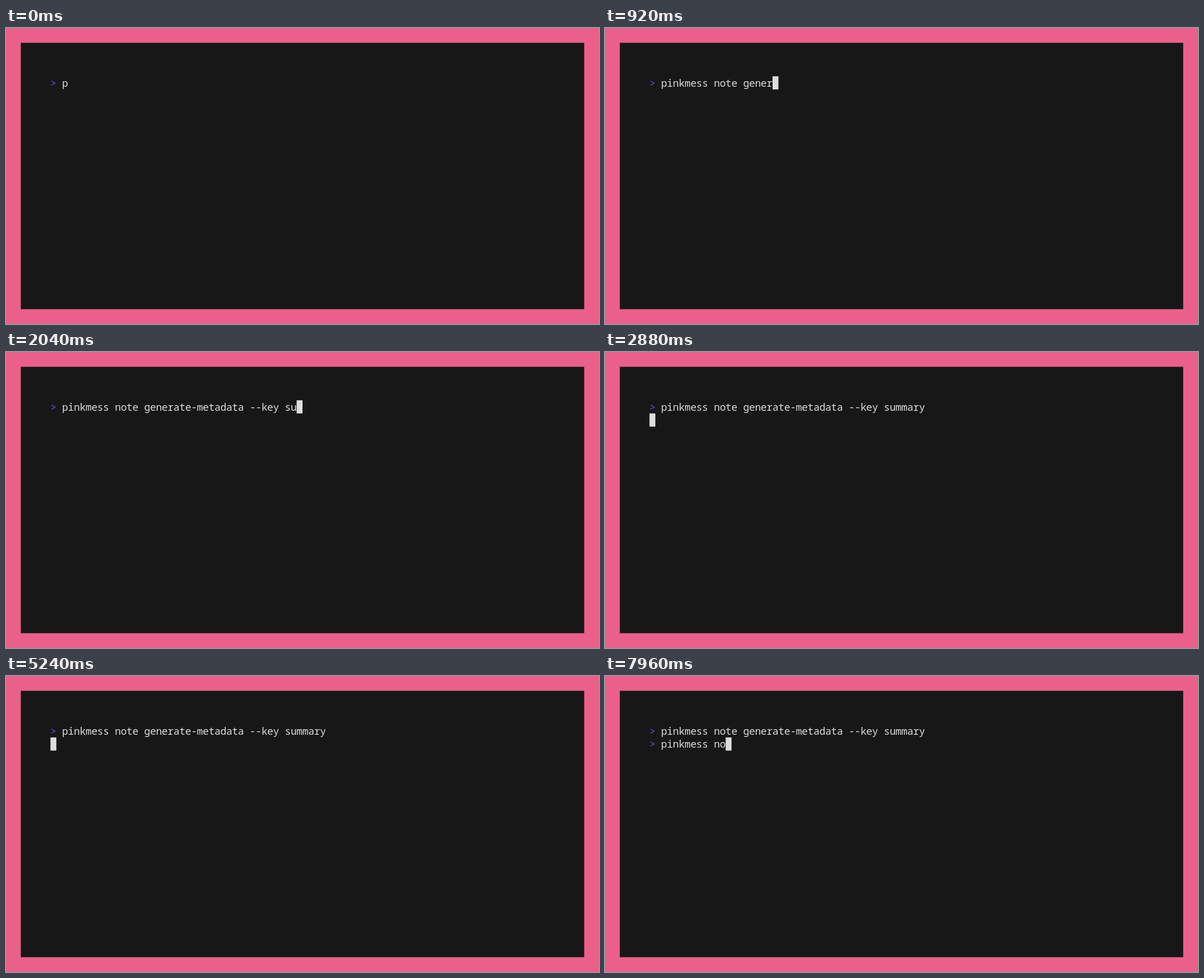
Write an HTML page with a canvas that moves like this. It is 1058x529 px and loops after 8000 ms.

```html
<!DOCTYPE html>
<html lang="en">
<head>
<meta charset="utf-8">
<title>Terminal</title>
<style>
  html, body { margin: 0; width: 100%; height: 100%; overflow: hidden; background: #eb608b; }
  canvas { display: block; }
</style>
</head>
<body>
<canvas id="stage" width="1058" height="529"></canvas>
<script>
const ctx = document.getElementById("stage").getContext("2d");
const LOOP = 8000, TICK = 40;
const CELL = 10.457, LINE = 23.5, LEFT = 79.35, TOP = 86.3, MARGIN = 26.45;
const COMMAND = "pinkmess note generate-metadata --key summary";
const ENTER = 2880, PROMPT = 6960, RETYPE = 7440;
const PINK = "#eb608b", DARK = "#171717", LIGHT = "#dddddd", VIOLET = "#5a56e0";

// Three characters land in every four ticks.
const keysBy = time => {
  const tick = Math.floor(time / TICK);
  return tick - Math.floor(tick / 4);
};

function drawCells(text, col, row, color) {
  ctx.fillStyle = color;
  [...text].forEach((char, i) =>
    ctx.fillText(char, LEFT + (col + i + 0.5) * CELL, TOP + row * LINE + 18.4));
}

function drawLine(row, count) {
  drawCells(">", 0, row, VIOLET);
  drawCells(COMMAND.slice(0, count), 2, row, LIGHT);
}

function drawCursor(col, row) {
  ctx.fillStyle = LIGHT;
  ctx.fillRect(LEFT + col * CELL, TOP + row * LINE, CELL, LINE);
}

// The idle cursor blinks off at 3440 ms, then toggles every 600 ms.
const blinkOn = time => time < 3440 || Math.floor((time - 3440) / 600) % 2 === 1;

function draw(time) {
  ctx.fillStyle = PINK;
  ctx.fillRect(0, 0, 1058, 529);
  ctx.fillStyle = DARK;
  ctx.fillRect(MARGIN, MARGIN, 1058 - 2 * MARGIN, 529 - 2 * MARGIN);

  const typed = Math.min(1 + keysBy(time), COMMAND.length);
  drawLine(0, typed);

  if (time < ENTER) {
    if (time >= TICK) drawCursor(2 + typed, 0);
  } else if (time < PROMPT) {
    if (blinkOn(time)) drawCursor(0, 1);
  } else {
    const retyped = time < RETYPE ? 0 : 1 + keysBy(time) - keysBy(RETYPE);
    drawLine(1, retyped);
    drawCursor(2 + retyped, 1);
  }
}

ctx.font = '18px "Noto Sans Mono", "DejaVu Sans Mono", monospace';
ctx.textAlign = "center";

function frame() {
  draw(performance.now() % LOOP);
  requestAnimationFrame(frame);
}
frame();
</script>
</body>
</html>
```
